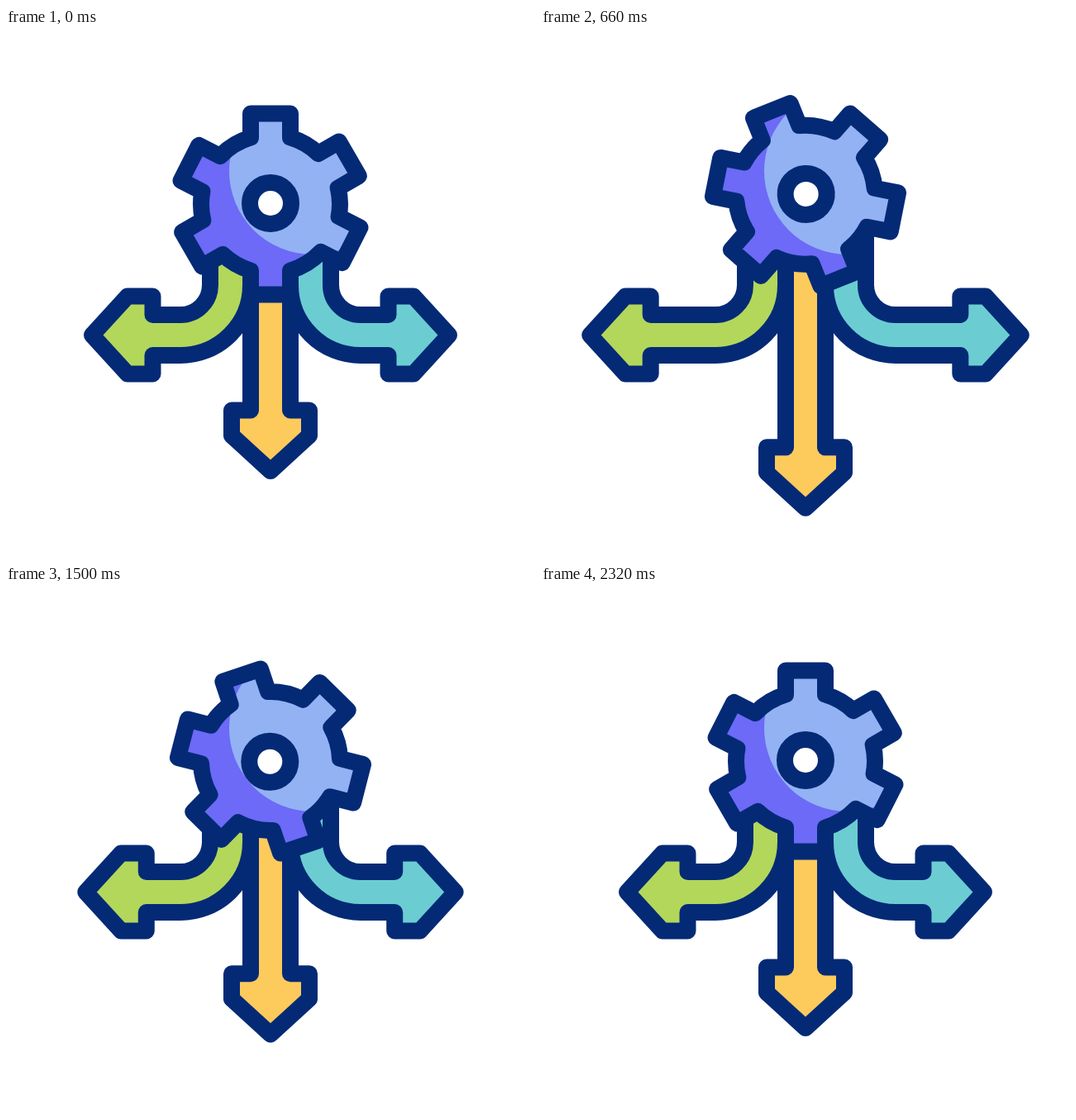
Write an HTML page that moves like this. It is 640x640 px and loops after 2400 ms.

```html
<!DOCTYPE html>
<html lang="en">
<head>
<meta charset="utf-8">
<title>Gear and arrows</title>
<style>
  html, body { margin: 0; width: 100%; height: 100%; overflow: hidden; background: #fff; }
  svg { display: block; width: 100%; height: 100%; }
  .line { stroke: #042a76; stroke-width: 20; stroke-linejoin: round; }
</style>
</head>
<body>
<svg viewBox="0 0 640 640">
  <defs>
    <clipPath id="gearClip"><path id="clipShape"/></clipPath>
  </defs>
  <path id="left" class="line" fill="#b2d75b"/>
  <path id="right" class="line" fill="#6bcdd1" transform="translate(640) scale(-1 1)"/>
  <path id="down" class="line" fill="#fdca5c"/>
  <g clip-path="url(#gearClip)">
    <rect width="640" height="640" fill="#6c6af6"/>
    <circle cx="371" cy="173" r="101" fill="#93b2f4"/>
  </g>
  <g id="gear" class="line">
    <path id="gearShape" fill="none"/>
    <circle cx="320" cy="212" r="25" fill="#fff"/>
  </g>
</svg>
<script>
const LOOP = 2400, STEP = 20;
const CENTER = { x: 320, y: 213 };
const byId = id => document.getElementById(id);

// Keyframes are [time, value] pairs.
const REACH = [[200, 0], [800, 52], [1375, 0], [1415, 0], [1765, 52], [2320, 0]];
const HOP = [[200, 0], [400, -52.5], [600, 0], [800, -52.5], [1000, 0],
             [1900, 0], [2100, -40], [2300, 0]];

const smooth = u => u * u * (3 - 2 * u);
const clamp = u => Math.min(1, Math.max(0, u));

function track(keys, t) {
  let value = keys[0][1];
  for (let i = 1; i < keys.length; i++) {
    const [t0, v0] = keys[i - 1], [t1, v1] = keys[i];
    if (t >= t0) value = v0 + (v1 - v0) * smooth(clamp((t - t0) / (t1 - t0)));
  }
  return value;
}

// Cubic Bezier easing with handles (x1, 0) and (x2, 1).
function ease(x, x1, x2) {
  let lo = 0, hi = 1;
  for (let i = 0; i < 24; i++) {
    const s = (lo + hi) / 2, r = 1 - s;
    if (3 * r * r * s * x1 + 3 * r * s * s * x2 + s ** 3 < x) lo = s; else hi = s;
  }
  return smooth(hi);
}

function gearPath() {
  const radius = 84, tip = 109.5, half = 24;
  const root = Math.sqrt(radius ** 2 - half ** 2);
  const teeth = [-90, -30, 27, 90, 150, 207];
  const parts = teeth.map((deg, i) => {
    const a = deg * Math.PI / 180, c = Math.cos(a), s = Math.sin(a);
    const at = (r, w) => `${CENTER.x + r * c - w * s} ${CENTER.y + r * s + w * c}`;
    const start = i ? `A${radius} ${radius} 0 0 1 ` : 'M';
    return `${start}${at(root, -half)}L${at(tip, -half)}L${at(tip, half)}L${at(root, half)}`;
  });
  const first = `${CENTER.x - half} ${CENTER.y - root}`;
  return `${parts.join('')}A${radius} ${radius} 0 0 1 ${first}Z`;
}

function sidePath(e) {
  const neck = 177.5 - e, shoulder = 147 - e, tip = 104 - e;
  return `M247 215V311A36 36 0 0 1 211 347H${neck}V324.5H${shoulder}L${tip} 371.5` +
    `L${shoulder} 418.5H${neck}V396H211A85 85 0 0 0 296 311V215`;
}

function downPath(e) {
  const neck = 462.5 + e, shoulder = 493 + e, tip = 536 + e;
  return `M296 230V${neck}H273V${shoulder}L320 ${tip}L367 ${shoulder}V${neck}H344V230`;
}

function draw(t) {
  const reach = track(REACH, t);
  byId('left').setAttribute('d', sidePath(reach));
  byId('right').setAttribute('d', sidePath(reach));
  byId('down').setAttribute('d', downPath(reach));

  const angle = 360 * ease(clamp((t - 200) / 2120), 0.33, 0.74);
  const pose = `translate(0 ${track(HOP, t)}) rotate(${t < 2320 ? angle : 0} ${CENTER.x} ${CENTER.y})`;
  byId('gear').setAttribute('transform', pose);
  byId('clipShape').setAttribute('transform', pose);
}

for (const id of ['gearShape', 'clipShape']) byId(id).setAttribute('d', gearPath());

const begin = performance.now();
function tick() {
  const t = (performance.now() - begin) % LOOP;
  draw(Math.floor(t / STEP) * STEP);
  requestAnimationFrame(tick);
}
draw(0);
requestAnimationFrame(tick);
</script>
</body>
</html>
```
